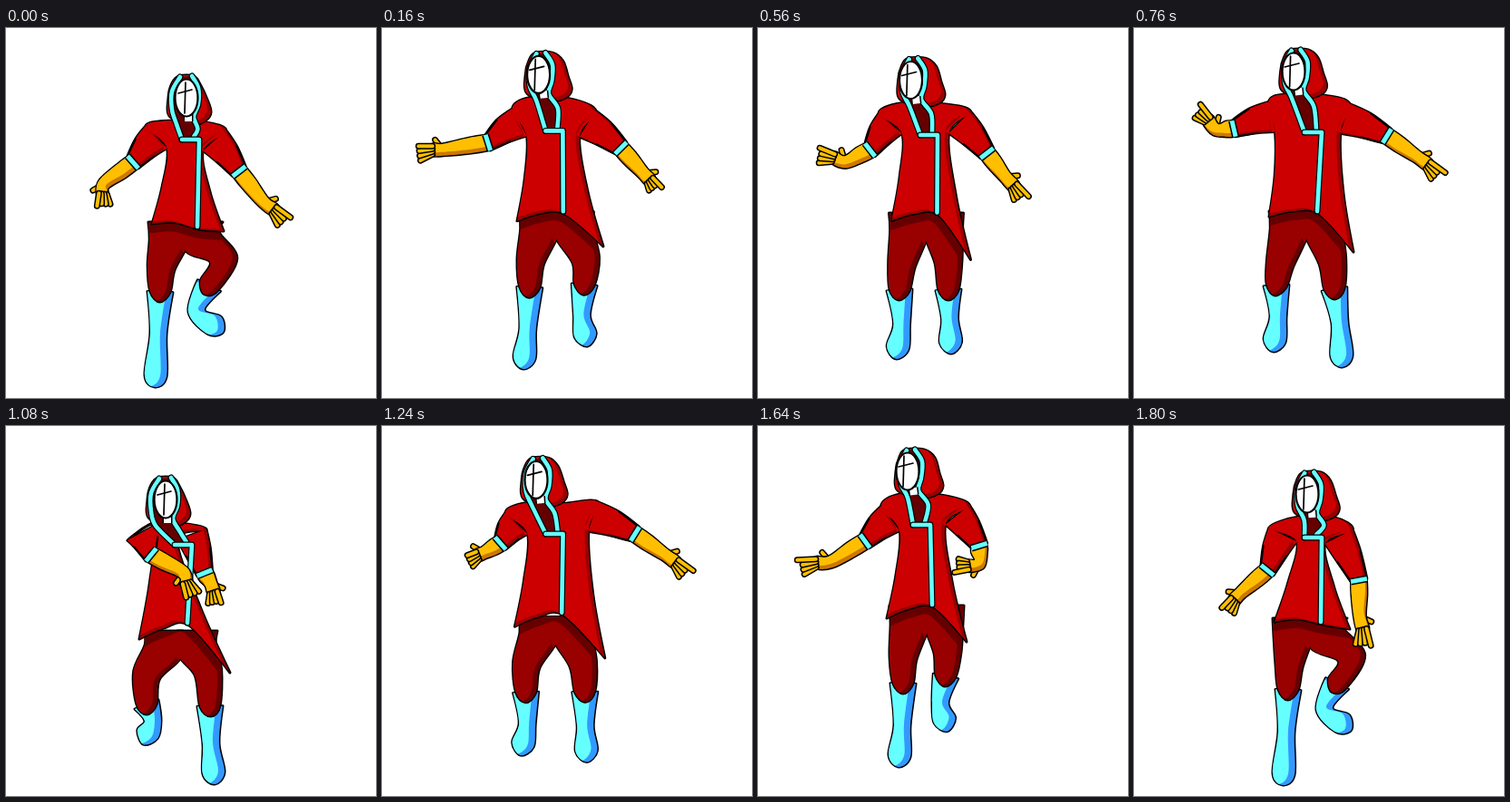
These frames come from a looping animation (408x408 px, 1840 ms). An HTML page with a canvas:

```html
<!DOCTYPE html>
<html lang="en">
<head>
<meta charset="utf-8">
<title>Hooded dancer</title>
<style>
html,body{margin:0;width:100%;height:100%;overflow:hidden;background:#fff}
canvas{display:block;width:100vw;height:100vh}
</style>
</head>
<body>
<canvas id="stage" width="408" height="408"></canvas>
<script>
const ctx = document.getElementById('stage').getContext('2d');
const LOOP = 1840, STEP = 40;
const RED = '#cc0000', DARK = '#990000', DEEP = '#660000', CYAN = '#66ffff',
  BLUE = '#3399ff', GOLD = '#ffbf00', BROWN = '#cc7700', INK = '#000';

// Joints of each pose; l/r are the viewer's left and right.
// face: x, y, turn   coat: lapel, front hem, left hem, right hem
// arm: shoulder, cuff, wrist, index tip, curl   leg: knee, ankle, shin, toe
const crouch = {
  face: [199, 77, 0], coat: [213,123, 211,219, 161,216, 240,224], hip: [198, 228],
  armL: [166,120, 140,148, 108,172, 104,199, .4], armR: [230,124, 257,158, 284,192, 314,214, .5],
  legL: [171,265, 170,291, 168,337, 165,384], legR: [240,256, 224,284, 210,312, 230,328]
};
const stroll = {
  face: [161, 67, .95], coat: [189,121, 193,205, 146,217, 227,264], hip: [181, 220],
  armL: [140,112, 137,158, 102,184, 60,186, .1], armR: [212,108, 226,157, 233,186, 252,217, .7],
  legL: [156,262, 155,294, 158,335, 153,361], legR: [201,258, 199,290, 196,316, 196,332]
};
const point = {
  face: [176, 48, .8], coat: [207,115, 202,202, 149,208, 242,247], hip: [190, 216],
  armL: [152,98, 110,111, 90,112, 68,84, .7], armR: [233,100, 279,119, 312,142, 344,165, .7],
  legL: [161,260, 157,284, 159,318, 155,345], legR: [219,258, 221,288, 227,325, 229,362]
};
const fold = {
  face: [176, 81, 0], coat: [205,131, 200,217, 147,235, 247,272], hip: [192, 240],
  armL: [149,118, 160,142, 196,162, 203,190, .2], armR: [205,120, 219,162, 226,174, 234,198, .4],
  legL: [155,275, 155,307, 162,325, 156,340], legR: [223,272, 225,309, 226,350, 229,383]
};
const open = {
  face: [166, 45, 1], coat: [196,111, 197,198, 146,212, 245,245], hip: [191, 214],
  armL: [148,100, 111,121, 57,125, 22,118, 0], armR: [226,101, 265,126, 289,152, 306,172, .9],
  legL: [162,256, 161,285, 159,330, 155,359], legR: [221,256, 223,283, 223,318, 223,342]
};
const sway = {
  face: [165, 50, 1], coat: [190,109, 192,197, 142,212, 230,238], hip: [186, 212],
  armL: [146,102, 118,127, 80,150, 40,152, .5], armR: [220,98, 244,132, 244,152, 213,158, .7],
  legL: [160,256, 160,284, 159,330, 156,364], legR: [209,250, 207,276, 201,305, 206,325]
};
const drop = {
  ...crouch,
  face: [191, 75, .7], coat: [207,123, 206,216, 155,216, 238,224], hip: [194, 226],
  armL: [164,120, 147,159, 118,184, 98,205, .5], armR: [226,122, 248,170, 249,210, 258,246, .4]
};
const fling = {...mix(fold, open, .6), armR: point.armR};

const keys = [[0, crouch], [200, open], [360, stroll], [760, point], [1080, fold],
  [1240, fling], [1400, open], [1640, sway], [1800, drop], [LOOP, crouch]];

function lerp(a, b, k) { return a.map((v, i) => v + (b[i] - v) * k); }
function mix(a, b, k) {
  const out = {};
  for (const part in a) out[part] = lerp(a[part], b[part], k);
  return out;
}
function poseAt(t) {
  const i = keys.findIndex(k => k[0] > t), [t0, a] = keys[i - 1], [t1, b] = keys[i];
  return mix(a, b, (t - t0) / (t1 - t0));
}

const add = (p, x, y) => [p[0] + x, p[1] + y];
const pairs = v => Array.from({length: v.length >> 1}, (_, i) => [v[2 * i], v[2 * i + 1]]);
const turned = ([x, y], a, k) => [
  k * (x * Math.cos(a) - y * Math.sin(a)), k * (x * Math.sin(a) + y * Math.cos(a))];

// Smooth path through the points; listed corners stay sharp.
function curve(pts, closed = true, corners = []) {
  const n = pts.length, path = new Path2D();
  const at = i => closed ? pts[(i + n) % n] : pts[Math.max(0, Math.min(n - 1, i))];
  const slope = (i, c) => corners.includes(i % n) ? 0 : (at(i + 1)[c] - at(i - 1)[c]) / 6;
  path.moveTo(...pts[0]);
  for (let i = 0; i < (closed ? n : n - 1); i++) {
    const p = at(i), q = at(i + 1);
    path.bezierCurveTo(p[0] + slope(i, 0), p[1] + slope(i, 1),
      q[0] - slope(i + 1, 0), q[1] - slope(i + 1, 1), q[0], q[1]);
  }
  if (closed) path.closePath();
  return path;
}
function poly(...pts) {
  const path = new Path2D();
  pts.forEach((p, i) => i ? path.lineTo(...p) : path.moveTo(...p));
  return path;
}

// The two edges of a limb around its centre line.
function edges(pts, radii) {
  const a = [], b = [];
  pts.forEach((p, i) => {
    const q = pts[Math.max(0, i - 1)], s = pts[Math.min(pts.length - 1, i + 1)];
    const dx = s[0] - q[0], dy = s[1] - q[1], k = radii[i] / (Math.hypot(dx, dy) || 1);
    a.push(add(p, -dy * k, dx * k));
    b.push(add(p, dy * k, -dx * k));
  });
  return {a, b};
}
function limb(pts, radii, round) {
  const {a, b} = edges(pts, radii), n = pts.length, end = pts[n - 1];
  const d = [end[0] - pts[n - 2][0], end[1] - pts[n - 2][1]];
  const tip = round ? [add(end, ...turned(d, 0, radii[n - 1] / (Math.hypot(...d) || 1)))] : [];
  const outline = [...a, ...tip, ...b.reverse()];
  return curve(outline, true, [0, outline.length - 1]);
}

function line(path, color = INK, width = 2) {
  ctx.strokeStyle = color; ctx.lineWidth = width; ctx.stroke(path);
}
function fill(path, color) { ctx.fillStyle = color; ctx.fill(path); }

// Joins the paths into one outlined form, lit from the side (dx, dy).
function form(paths, lit, dark, dx, dy, inside) {
  const whole = new Path2D();
  paths.forEach(p => { whole.addPath(p); line(p, INK, 3); });
  paths.forEach(p => fill(p, dark));
  ctx.save();
  ctx.clip(whole);
  ctx.translate(dx, dy);
  paths.forEach(p => fill(p, lit));
  ctx.translate(-dx, -dy);
  if (inside) inside();
  ctx.restore();
}

function armOf(values) {
  const [shoulder, cuff, wrist, tip] = pairs(values);
  const elbow = add(lerp(shoulder, cuff, .5), 0, -2);
  const {a, b} = edges([shoulder, elbow, cuff, wrist], [17, 14, 9, 7]);
  const sleeve = [...a.slice(0, 3), ...b.slice(0, 3).reverse()];
  return {a, b, cuff, wrist, tip, curl: values[8], sleeve: curve(sleeve, true, [0, 2, 3, 5])};
}

function drawFinger(from, to) {
  const path = poly(from, to);
  line(path, INK, 7);
  line(path, GOLD, 4);
}
function drawGlove({a, b, cuff, wrist, tip, curl}, side) {
  const palm = lerp(wrist, tip, .4), reach = [tip[0] - palm[0], tip[1] - palm[1]];
  const size = Math.hypot(...reach) || 1;
  drawFinger(wrist, add(wrist, ...turned(reach, -side * .9, 14 / size)));
  form([limb([cuff, lerp(cuff, wrist, .4), wrist, palm], [8.5, 8.5, 6.5, 6.5], true)],
    GOLD, BROWN, -2, -4);
  for (let i = 3; i >= 0; i--) {
    const base = add(palm, ...turned(reach, side * 1.57, (i * 3 - 4) / size));
    const length = i ? 1 - .6 * curl : 1 - .1 * curl;
    drawFinger(base, add(base, ...turned(reach, side * i * .16, length * .9)));
  }
  ctx.lineCap = 'butt';
  const band = poly(a[2], b[2]);
  line(band, INK, 8);
  line(band, CYAN, 5);
  ctx.lineCap = 'round';
}

function drawBoot([, ankle, shin, toe]) {
  form([limb([ankle, shin, toe], [14, 9, 12], true)], CYAN, BLUE, -7, -1);
}

function drawHead([x, y, turn], lapel, hem) {
  const at = (dx, dy) => [x + dx, y + dy];
  const left = turn * 7 - 20, right = 27 + turn * 12, corner = add(lapel, -19, 0);
  form([curve([at(left + 2, 21), at(left, 0), at(left + 4, -16), at(-8 + turn * 6, -24),
    at(8 + turn * 10, -24), at(15 + turn * 15, -15), at(right - 4, 2), at(right, 16),
    at(right - 6, 25), at(9 + turn * 6, 29)].reverse())], RED, DARK, -4, -3);

  const front = [at(-7 + turn * 6, -23), at(-16 + turn * 8, -7), at(-16 + turn * 8, 13),
    at(-11 + turn * 11, 29), corner];
  const back = [at(6 + turn * 2, -24), at(13 + turn * 3, -11), at(13 + turn * 2, 7),
    at(8 + turn * 4, 21), lerp(at(12 + turn * 10, 31), lapel, .2), add(lapel, -6, -3)];
  fill(poly(...front, lapel, ...back.slice().reverse()), DEEP);
  for (const path of [curve(back, false), curve(front, false), poly(corner, lapel, hem)]) {
    line(path, INK, 7);
    line(path, CYAN, 4.6);
  }

  const neck = poly(at(2 + turn * 4, 18), at(2 + turn * 5, 26));
  ctx.lineCap = 'butt';
  line(neck, INK, 11);
  line(neck, '#fff', 8);
  ctx.lineCap = 'round';
  const mask = new Path2D();
  mask.ellipse(x, y, 12.5, 20.5, 0, 0, 7);
  fill(mask, '#fff');
  line(mask, INK, 2.2);
  line(poly(at(-1 - turn * 3, -17), at(-2 - turn * 3, 17)), INK, 1.7);
  line(poly(at(-9 - turn, -5), at(6, -9)), INK, 1.7);
}

function draw(pose) {
  const [lapel, hem, hemL, hemR] = pairs(pose.coat);
  const [x, y, turn] = pose.face;
  const armL = armOf(pose.armL), armR = armOf(pose.armR);
  const legL = pairs(pose.legL), legR = pairs(pose.legR);
  const pants = [[legL, -19], [legR, 19]].map(([[knee, ankle], dx]) =>
    limb([add(pose.hip, dx, -14), add(pose.hip, dx, 8), knee, ankle], [22, 21, 15, 11], true));
  const body = curve([
    [x - 12 + turn * 4, y + 25], armL.a[0], armL.b[0], add(lerp(armL.b[0], hemL, .5), 3, 0), hemL,
    add(lerp(hemL, hem, .5), 0, -3), add(hem, 2, 3), hemR,
    add(lerp(hemR, armR.a[0], .5), -4, 0), armR.a[0], armR.b[0], [x + 17 + turn * 19, y + 26]
  ], true, [4, 7]);

  ctx.fillStyle = '#fff';
  ctx.fillRect(0, 0, 408, 408);
  ctx.lineJoin = ctx.lineCap = 'round';
  drawBoot(legL);
  drawBoot(legR);
  form(pants, DARK, DEEP, -5, -1, () => line(body, DEEP, 20));
  form([body, armL.sleeve, armR.sleeve], RED, DARK, -4, -2);
  for (const {a, b} of [armL, armR])
    for (const edge of [a, b]) line(poly(edge[1], edge[2]));
  drawHead(pose.face, lapel, hem);
  drawGlove(armR, 1);
  drawGlove(armL, -1);
}

let start = null;
function tick(now) {
  if (start === null) start = now;
  draw(poseAt(Math.floor((now - start) / STEP) * STEP % LOOP));
  requestAnimationFrame(tick);
}
draw(poseAt(0));
requestAnimationFrame(tick);
</script>
</body>
</html>
```
